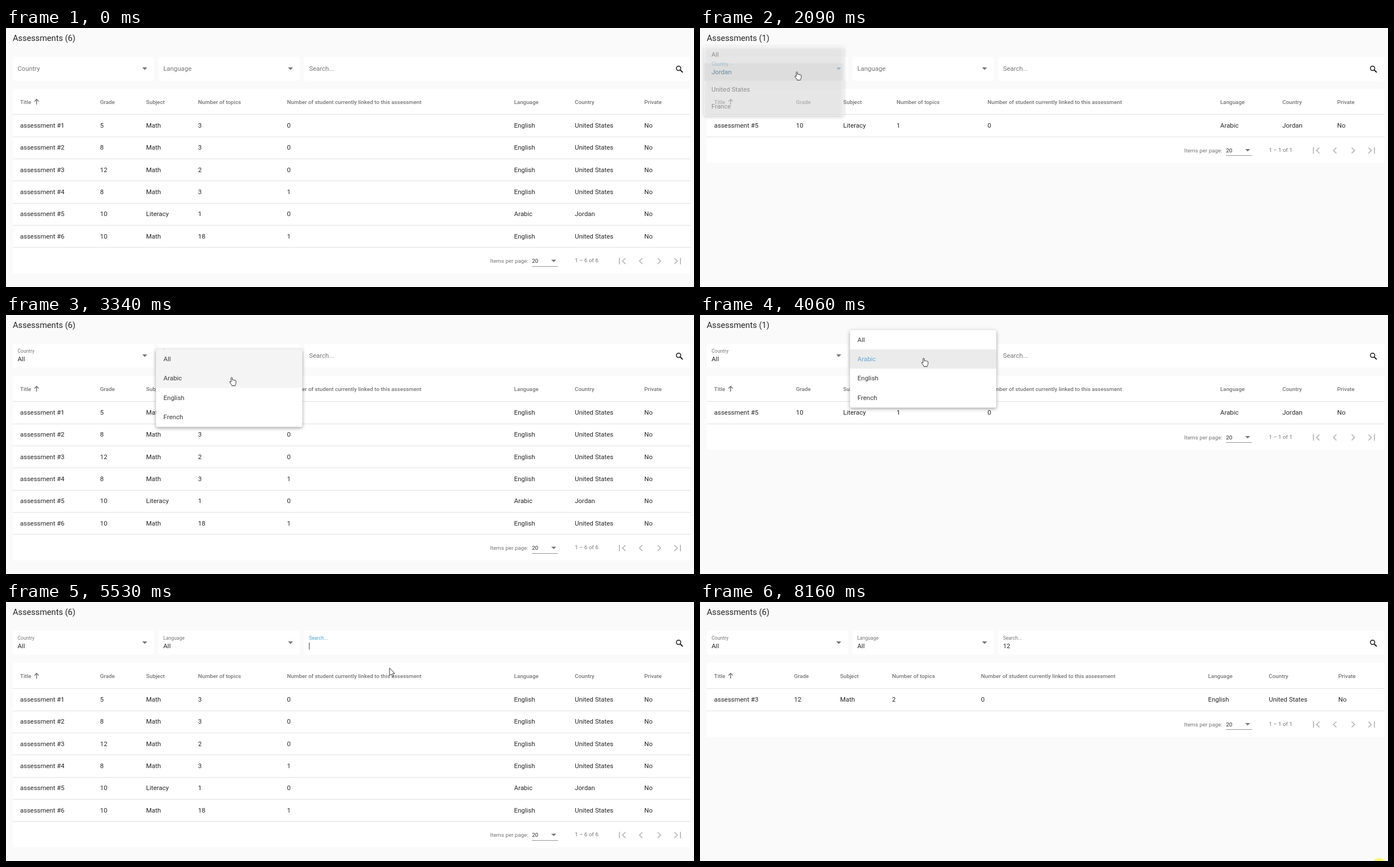
Write an HTML page with a canvas that moves like this. It is 1218 by 460 pixels and loops after 8.22 s.

```html
<!DOCTYPE html>
<html lang="en">
<head>
<meta charset="utf-8">
<title>Assessments</title>
<style>
  html, body { margin: 0; height: 100%; overflow: hidden; background: #fafafa; }
  canvas { display: block; }
</style>
</head>
<body>
<canvas id="stage" width="1218" height="460"></canvas>
<script>
const ctx = document.getElementById('stage').getContext('2d');
const LOOP = 8220, STEP = 65, START = 400;
const INK = '#262626', GREY = '#757575', BLUE = '#4ba3d9', PALE = '#bcbcbc';
const BODY = 11.46, SMALL = 9.82, FLOAT = 8.6, ROW = 39.3, ITEM = 34.2;

const headers = ['Title', 'Grade', 'Subject', 'Number of topics',
  'Number of student currently linked to this assessment', 'Language', 'Country', 'Private'];
const wideColumns = [25, 166.5, 248, 340, 497.5, 899.5, 1007, 1130];
const narrowColumns = [25, 170, 253.5, 348, 509, 921, 1031, 1128];
const rows = [[5, 'Math', 3, 0], [8, 'Math', 3, 0], [12, 'Math', 2, 0],
  [8, 'Math', 3, 1], [10, 'Literacy', 1, 0], [10, 'Math', 18, 1]].map((r, i) =>
  ['assessment #' + (i + 1), ...r, ...(i === 4 ? ['Arabic', 'Jordan'] : ['English', 'United States']), 'No']);

const all = [0, 1, 2, 3, 4, 5];
const tables = [[0, all, 6], [1720, [4], 1], [2620, all, 6], [3660, [4], 1],
  [4725, all, 6], [6120, [0, 2, 3, 4, 5], 6], [6520, [2], 6]];

const countries = ['All', 'Jordan', 'United States', 'France'];
const languages = ['All', 'Arabic', 'English', 'French'];
const menus = [
  { x: 7, options: countries, selected: 0, pick: 1, open: 1060, press: 1505, close: 1640, fresh: true },
  { x: 7, options: countries, selected: 1, pick: 0, open: 2025, press: 2440, close: 2540 },
  { x: 265.5, options: languages, selected: 0, pick: 1, open: 3000, press: 3440, close: 3540, fresh: true },
  { x: 265.5, options: languages, selected: 1, pick: 0, open: 3790, press: 4410, close: 4500 }
];

// time, x, y of the pointer tip
const path = [[400, 1151, 443], [920, 190, 76], [1190, 186, 75], [1440, 185, 108], [1640, 185, 108],
  [1960, 171.5, 77], [2160, 171.5, 77], [2380, 172, 46], [2560, 172, 46], [2860, 388, 73],
  [3080, 390, 74], [3310, 399.5, 110], [3540, 399.5, 110], [3740, 398, 76], [4050, 396, 76],
  [4340, 378, 42], [4690, 378, 42], [5050, 684, 75], [5200, 684, 75], [5450, 680, 118],
  [5720, 615, 67], [6900, 615, 67], [7440, 945, 435], [7760, 945, 435], [8070, 1202, 466]];
const handTimes = [[880, 1440], [1700, 2620], [2720, 3600], [3700, 4500]];

const arrow = new Path2D('M0 0V13.5L3 10.8L5 15.2L7.2 14.2L5.3 10H9.3Z');
const hand = new Path2D('M-1.1 9V1.4Q0 -.4 1.1 1.4V5.4Q2.2 4.6 3.3 5.6Q4.5 5 5.5 6.2Q7.1 5.6 7.7 7.2V10.5' +
  'Q7.7 12.5 6.3 14.4V15.6H.3V14.4L-3.7 9.4Q-3.9 7.2 -1.1 9Z');

const clamp = v => Math.max(0, Math.min(1, v));
const lerp = (a, b, p) => a + (b - a) * p;
const latest = (list, t) => list.filter(e => e[0] <= t).pop();

function text(s, x, y, size = BODY, color = INK, weight = 400) {
  ctx.font = `${weight} ${size}px Roboto, sans-serif`;
  ctx.fillStyle = color;
  ctx.fillText(s, x, y);
}

function box(x, y, w, h, color = '#fff', radius = 3) {
  ctx.fillStyle = color;
  ctx.beginPath();
  ctx.roundRect(x, y, w, h, radius);
  ctx.fill();
}

function line(color, width, ...points) {
  ctx.strokeStyle = color;
  ctx.lineWidth = width;
  ctx.beginPath();
  points.forEach(([x, y]) => ctx.lineTo(x, y));
  ctx.stroke();
}

function triangle(x, y, color = GREY) {
  ctx.fillStyle = color;
  ctx.beginPath();
  ctx.moveTo(x - 4.4, y);
  ctx.lineTo(x + 4.4, y);
  ctx.lineTo(x, y + 4.4);
  ctx.fill();
}

function disc(x, y, r, color) {
  ctx.fillStyle = color;
  ctx.beginPath();
  ctx.arc(x, y, r, 0, 7);
  ctx.fill();
}

function field(x, w, label, value, floated, focused) {
  box(x, 51, w, 42.5);
  text(label, x + 8.4, lerp(76.3, 67, floated), lerp(BODY, FLOAT, floated), focused ? BLUE : GREY);
  text(value, x + 8.4, 82);
}

function filters(t, q) {
  const country = t < 1505 ? '' : t < 2440 ? 'Jordan' : 'All';
  const language = t < 3440 ? '' : t < 4410 ? 'Arabic' : 'All';
  const query = t < 5920 ? '' : t < 6390 ? '1' : '12';
  const onCountry = t >= 1060 && t < 3000, onLanguage = t >= 3000 && t < 5050;
  field(12, 249.5, 'Country', country, clamp((q - 1000) / 130), onCountry);
  triangle(245.6, 70, onCountry ? BLUE : GREY);
  field(270, 249.5, 'Language', language, clamp((q - 2940) / 130), onLanguage);
  triangle(503.7, 70, onLanguage ? BLUE : GREY);
  field(528, 684, 'Search...', query, clamp((q - 5170) / 100), t >= 5200 && t < 8095);
  if (t >= 5200 && t < 8060 && !(t >= 6920 && t < 7200)) {
    box(536.5 + query.length * 6.45, 72, 0.9, 12.5, INK, 0);
  }
  ctx.strokeStyle = '#1a1a1a';
  ctx.lineWidth = 1.5;
  ctx.beginPath();
  ctx.arc(1190.7, 71.6, 3.9, 0, 7);
  ctx.stroke();
  line('#1a1a1a', 2, [1193.8, 74.7], [1198, 78.9]);
}

function chevron(x, y, dir, bar) {
  const shift = bar ? 3 * dir : 0;
  line(PALE, 1.9, [x + 2.6 * dir + shift, y - 5.1], [x - 2.5 * dir + shift, y], [x + 2.6 * dir + shift, y + 5.1]);
  if (bar) line(PALE, 1.9, [x - 5 * dir, y - 5.7], [x - 5 * dir, y + 5.7]);
}

function table(t) {
  const [, visible, total] = latest(tables, t);
  const n = visible.length, bottom = 153.85 + ROW * n;
  const columns = n === 1 && visible[0] === 4 ? narrowColumns : wideColumns;
  text(`Assessments (${total})`, 12, 23.4, 14.7);
  box(12, 108, 1200, bottom + 46 - 108);
  headers.forEach((h, c) => text(h, columns[c], 134.6, SMALL, GREY, 500));
  line(GREY, 1.5, [54.2, 136], [54.2, 127]);
  line(GREY, 1.5, [50.5, 130.4], [54.2, 126.6], [57.9, 130.4]);
  box(12, 153, 1200, 1, '#e0e0e0', 0);
  visible.forEach((r, i) => {
    rows[r].forEach((cell, c) => text(cell, columns[c], 177 + ROW * i));
    box(12, Math.floor(153.85 + ROW * (i + 1)), 1200, 1, '#e0e0e0', 0);
  });
  const y = bottom + 24;
  text('Items per page:', 857, y + 3.4, SMALL, GREY);
  text('20', 931.3, y + 3.4, SMALL);
  triangle(969.6, y - 2.2);
  box(931, Math.floor(bottom + 33.5), 46, 1, '#949494', 0);
  text(`1 – ${n} of ${n}`, 1007, y + 2.8, SMALL, GREY);
  chevron(1091, y + .3, 1, true);
  chevron(1124, y + .3, 1);
  chevron(1156.3, y + .3, -1);
  chevron(1189, y + .3, -1, true);
}

function menu(m, q, pointer) {
  const grow = clamp((q - m.open) / 130);
  const alpha = grow * clamp(1 - (q - m.close) / 100);
  if (!alpha) return;
  const top = 61 - ITEM * m.selected, w = lerp(236, 259, grow), h = ITEM * 4 + 1;
  const pressed = q >= m.press;
  ctx.save();
  ctx.globalAlpha = alpha;
  ctx.translate(m.x, 78);
  ctx.scale(1, lerp(.8, 1, grow));
  ctx.translate(0, top - 78);
  ctx.shadowColor = 'rgba(0,0,0,.38)';
  ctx.shadowBlur = 6;
  ctx.shadowOffsetY = 2;
  box(0, 0, w, h);
  ctx.shadowColor = 'transparent';
  ctx.beginPath();
  ctx.roundRect(0, 0, w, h, 3);
  ctx.clip();
  m.options.forEach((option, i) => {
    const y = i * ITEM, chosen = pressed ? i === m.pick : i === m.selected;
    const hovered = pointer.y >= top + y && pointer.y < top + y + ITEM;
    const shade = pressed && chosen ? .12 : chosen && hovered ? .08 : chosen || hovered ? .045 : 0;
    box(0, y, w, ITEM, `rgba(0,0,0,${shade})`, 0);
    if (pressed && chosen) {
      ctx.save();
      ctx.beginPath();
      ctx.rect(0, y, w, ITEM);
      ctx.clip();
      disc(pointer.x - m.x, pointer.y - top, (q - m.press) * 1.66, 'rgba(0,0,0,.11)');
      ctx.restore();
    }
    const tinted = chosen && (pressed || !m.fresh);
    text(option, 13.3, y + 21.2, BODY, tinted ? '#62a8d6' : '#3a3a3a');
  });
  ctx.restore();
}

function pointerAt(q) {
  const i = path.findIndex(p => p[0] > q);
  if (i < 0) return { x: 1202, y: 466 };
  if (i === 0) return { x: 1300, y: 500 };
  const [t0, x0, y0] = path[i - 1], [t1, x1, y1] = path[i];
  const u = (q - t0) / (t1 - t0), p = u * u * (3 - 2 * u);
  return { x: lerp(x0, x1, p), y: lerp(y0, y1, p) };
}

function drawPointer({ x, y }, q) {
  const shape = handTimes.some(([a, b]) => q >= a && q < b) ? hand : arrow;
  ctx.save();
  ctx.translate(x, y);
  ctx.fillStyle = '#fff';
  ctx.strokeStyle = '#333';
  ctx.lineWidth = 1;
  ctx.fill(shape);
  ctx.stroke(shape);
  ctx.restore();
}

function draw(now) {
  const t = now % LOOP;
  const q = START + Math.floor((t - START) / STEP) * STEP;
  const pointer = pointerAt(q);
  box(0, 0, 1218, 460, '#fafafa', 0);
  table(t);
  filters(t, q);
  menus.forEach(m => menu(m, q, pointer));
  if (t >= 8095) disc(1202, 466, 11.3, '#f8f56e');
  drawPointer(pointer, q);
  requestAnimationFrame(draw);
}
requestAnimationFrame(draw);
</script>
</body>
</html>
```
